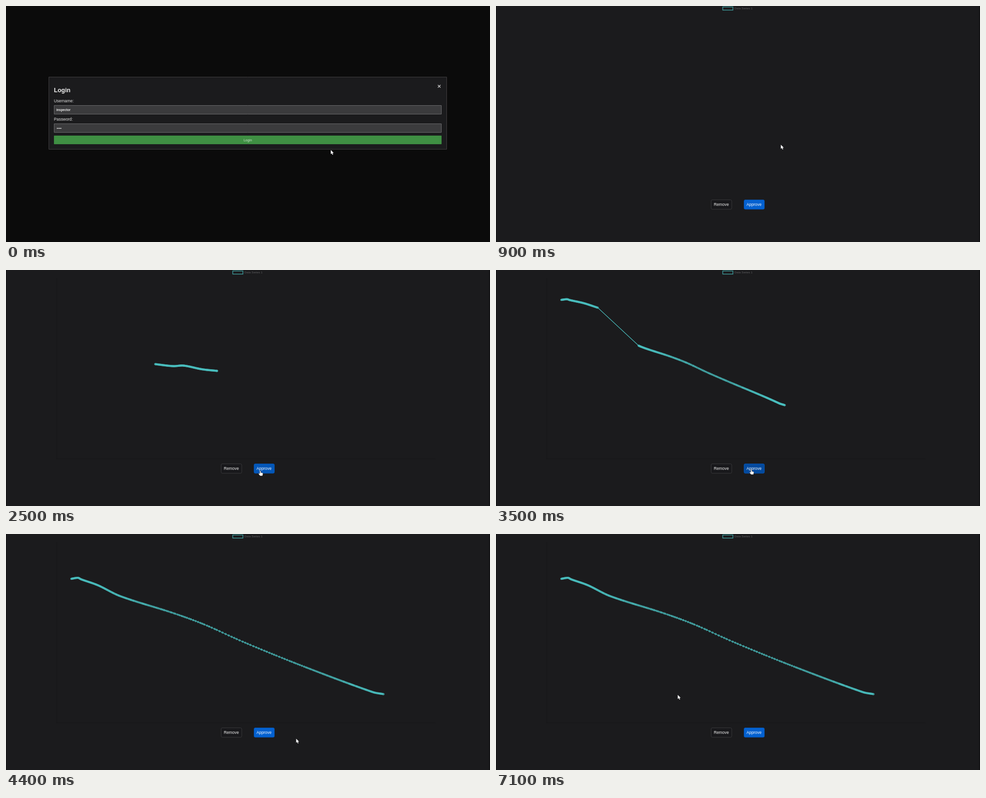
An HTML page with a canvas that plays this animation: 1000 by 490 pixels, repeating every 7.2 s.

```html
<!DOCTYPE html>
<html lang="en">
<head>
<meta charset="utf-8">
<title>Login and series review</title>
<style>
  html, body { margin: 0; width: 100%; height: 100%; overflow: hidden; background: #0b0b0b; }
  canvas { display: block; width: 1000px; height: 490px; }
</style>
</head>
<body>
<canvas id="stage" width="1000" height="490"></canvas>
<script>
const ctx = document.getElementById('stage').getContext('2d');
const LOOP = 7200, STEP = 100;
const CHART_OPEN = 600, AXES_SHOWN = 1000;
const MIDDLE = 204;
const TEAL = '#4bc0c0';

const clamp = v => Math.min(1, Math.max(0, v));
const easeOut = v => 1 - (1 - clamp(v)) ** 4;
const mix = (a, b, k) => a.map((v, i) => v + (b[i] - v) * k);

// Smooth height at x through key points ordered by x (cubic Hermite)
function heightAt(keys, x) {
  const last = keys.length - 1;
  const slope = i => {
    const a = keys[Math.max(0, i - 1)], b = keys[Math.min(last, i + 1)];
    return (b[1] - a[1]) / (b[0] - a[0]);
  };
  const i = Math.max(0, keys.findIndex(k => k[0] >= x) - 1);
  const [x0, y0] = keys[i], [x1, y1] = keys[i + 1];
  const w = x1 - x0, u = (x - x0) / w, v = 1 - u;
  return v * v * (1 + 2 * u) * y0 + u * u * (1 + 2 * v) * y1
    + u * v * w * (v * slope(i) - u * slope(i + 1));
}

// Dots along a curve, spaced by a rule with a little seeded irregularity
function dotsAlong(keys, spacing) {
  const dots = [keys[0]], end = keys[keys.length - 1];
  let seed = 7, travelled = 0, previous = keys[0];
  const random = () => (seed = seed * 16807 % 2147483647) / 2147483647;
  let gap = spacing(previous[0]);
  for (let x = previous[0]; x < end[0]; x += 0.1) {
    const point = [x, heightAt(keys, x)];
    travelled += Math.hypot(point[0] - previous[0], point[1] - previous[1]);
    previous = point;
    if (travelled < gap) continue;
    dots.push(point);
    travelled -= gap;
    gap = spacing(x) * (0.8 + 0.4 * random());
  }
  return [...dots, end];
}

const even = () => 1.5;
const sparseInside = x => 0.9 + 5.2 * Math.exp(-(((x - 485) / 190) ** 2));

// Left dots slide down from the top edge, the others fan out from the middle
function lastOrigin([x]) {
  if (x < 225) return [135 + (x - 135) * 0.65, 21 - (x - 135) * 0.03];
  const s = (x - 225) / 555;
  return [386 - 32 * s, 200 + 12 * s ** 9];
}

const series = [
  { shown: 1000, start: 950, origin: ([x]) => [x, MIDDLE],
    dots: dotsAlong([[380, 27], [386, 49], [396, 63], [455, 100], [492, 126], [527, 161], [575, 192], [619, 231]], even) },
  { shown: 2300, start: 2250, origin: () => [378, MIDDLE],
    dots: dotsAlong([[276, 191.5], [330, 197.5], [362, 196], [417, 207], [463, 212]], even) },
  { shown: 3300, start: 3310, origin: lastOrigin,
    dots: dotsAlong([[135, 93], [149, 91], [155, 94], [190, 106.5], [236, 129], [345, 164], [410, 188],
      [490, 224], [615, 275], [757, 328], [780, 332.5]], sparseInside) },
];

// Time, then pointer position
const pointerStops = [[0, 671, 299], [500, 612, 280], [900, 588.5, 288], [1600, 499.5, 415], [2000, 525, 418],
  [3500, 528, 414], [4400, 599.5, 425], [5200, 599.5, 425], [6100, 375.5, 334], [LOOP, 375.5, 334]];

function pointerAt(t) {
  const i = pointerStops.findIndex(stop => stop[0] > t);
  const a = pointerStops[i - 1], b = pointerStops[i];
  return mix(a, b, (t - a[0]) / (b[0] - a[0])).slice(1);
}

const overApprove = ([x, y]) => x > 511 && x < 556 && y > 401 && y < 423;
const pressed = t => [1400, 2150, 3250].some(down => t >= down && t < down + 300);

function text(string, x, y, size, color, weight = 'normal', align = 'left') {
  ctx.font = `${weight} ${size}px "Liberation Sans", Arial, sans-serif`;
  ctx.textAlign = align;
  ctx.fillStyle = color;
  ctx.fillText(string, x, y);
}

function box(x, y, w, h, fill, border, radius = 0) {
  ctx.beginPath();
  ctx.roundRect(x + 0.5, y + 0.5, w - 1, h - 1, radius);
  ctx.fillStyle = fill;
  ctx.fill();
  ctx.lineWidth = 1;
  ctx.strokeStyle = border;
  ctx.stroke();
}

function field(label, y) {
  text(label, 99, y, 8.4, '#e2e2e2');
  box(99, y + 6, 801, 19, '#3b3b3d', '#69696b');
}

function drawLogin() {
  ctx.fillStyle = '#0b0b0b';
  ctx.fillRect(0, 0, 1000, 490);
  box(88, 147, 823, 151, '#1b1b1d', '#413e40');
  text('Login', 99, 179, 12.5, '#f0f0f0', 'bold');
  text('×', 895, 170.5, 13, '#c6c6c6', 'bold', 'center');
  field('Username:', 200);
  text('inspector', 104, 218, 6.5, '#f0f0f0', 'bold');
  field('Password:', 238);
  ctx.fillStyle = '#eeeeee';
  for (let i = 0; i < 4; i++) {
    ctx.beginPath();
    ctx.arc(106 + i * 2.5, 254, 1, 0, 7);
    ctx.fill();
  }
  box(99, 269, 801, 18, '#3f8f43', '#3b863f');
  text('Login', 499.5, 280.5, 7, '#cfe3d0', 'normal', 'center');
}

function drawSeries({ start, origin, dots }, t) {
  const progress = easeOut((t - start) / 1000);
  const placed = dots.map(dot => mix(origin(dot), dot, progress));
  ctx.strokeStyle = TEAL;
  ctx.lineWidth = 1.1;
  ctx.beginPath();
  placed.forEach(p => ctx.lineTo(...p));
  ctx.stroke();
  ctx.lineWidth = 0.9;
  ctx.fillStyle = 'rgba(75, 192, 192, 0.2)';
  for (const [x, y] of placed) {
    ctx.beginPath();
    ctx.arc(x, y, 1.75, 0, 7);
    ctx.fill();
    ctx.stroke();
  }
}

function drawChart(t, pointer) {
  ctx.fillStyle = '#1b1b1d';
  ctx.fillRect(0, 0, 1000, 490);
  ctx.fillStyle = '#111113';
  ctx.fillRect(0, 0, 1, 490);
  ctx.fillRect(998, 0, 2, 490);
  if (t >= AXES_SHOWN) {
    ctx.fillStyle = '#161618';
    ctx.fillRect(104.5, 17, 1, 375);
    ctx.fillRect(104.5, 391.5, 783, 1);
  }
  ctx.strokeStyle = '#3f9c9c';
  ctx.lineWidth = 1.4;
  ctx.strokeRect(468.5, 2, 21, 6.5);
  text('Data Series 1', 492.5, 7, 6.2, '#5c5c5e');

  const current = series.filter(s => t >= s.shown).pop();
  if (current) drawSeries(current, t);

  box(444, 402, 43.5, 20.5, '#18181b', '#38383b', 2.5);
  text('Remove', 465.5, 415, 8.4, '#eeeeee', 'normal', 'center');
  const blue = pressed(t) ? '#044a9e' : overApprove(pointer) ? '#0457b8' : '#0461d0';
  box(512, 402, 43, 20.5, blue, '#0553b0', 2.5);
  text('Approve', 533, 415, 8.4, '#f2f6fc', 'normal', 'center');
}

const arrow = new Path2D('M0 0V8.6L2 6.8L3.4 10L4.9 9.3L3.5 6.3H6.2Z');
const hand = new Path2D('M-1.6 .8Q-.8-.4 .2.8V4L3.6 4.7Q5 5 4.7 6.6L3.8 10.6H-1L-4 6.8Q-4 5.2-2.6 5.8L-1.6 6.6Z');

function drawPointer(pointer, shape) {
  ctx.save();
  ctx.translate(...pointer);
  ctx.strokeStyle = '#101012';
  ctx.lineWidth = 1;
  ctx.stroke(shape);
  ctx.fillStyle = '#f8f8f8';
  ctx.fill(shape);
  ctx.restore();
}

function frame() {
  const t = Math.floor(performance.now() % LOOP / STEP) * STEP;
  const pointer = pointerAt(t);
  if (t < CHART_OPEN) drawLogin();
  else drawChart(t, pointer);
  drawPointer(pointer, overApprove(pointer) ? hand : arrow);
  requestAnimationFrame(frame);
}
frame();
</script>
</body>
</html>
```
